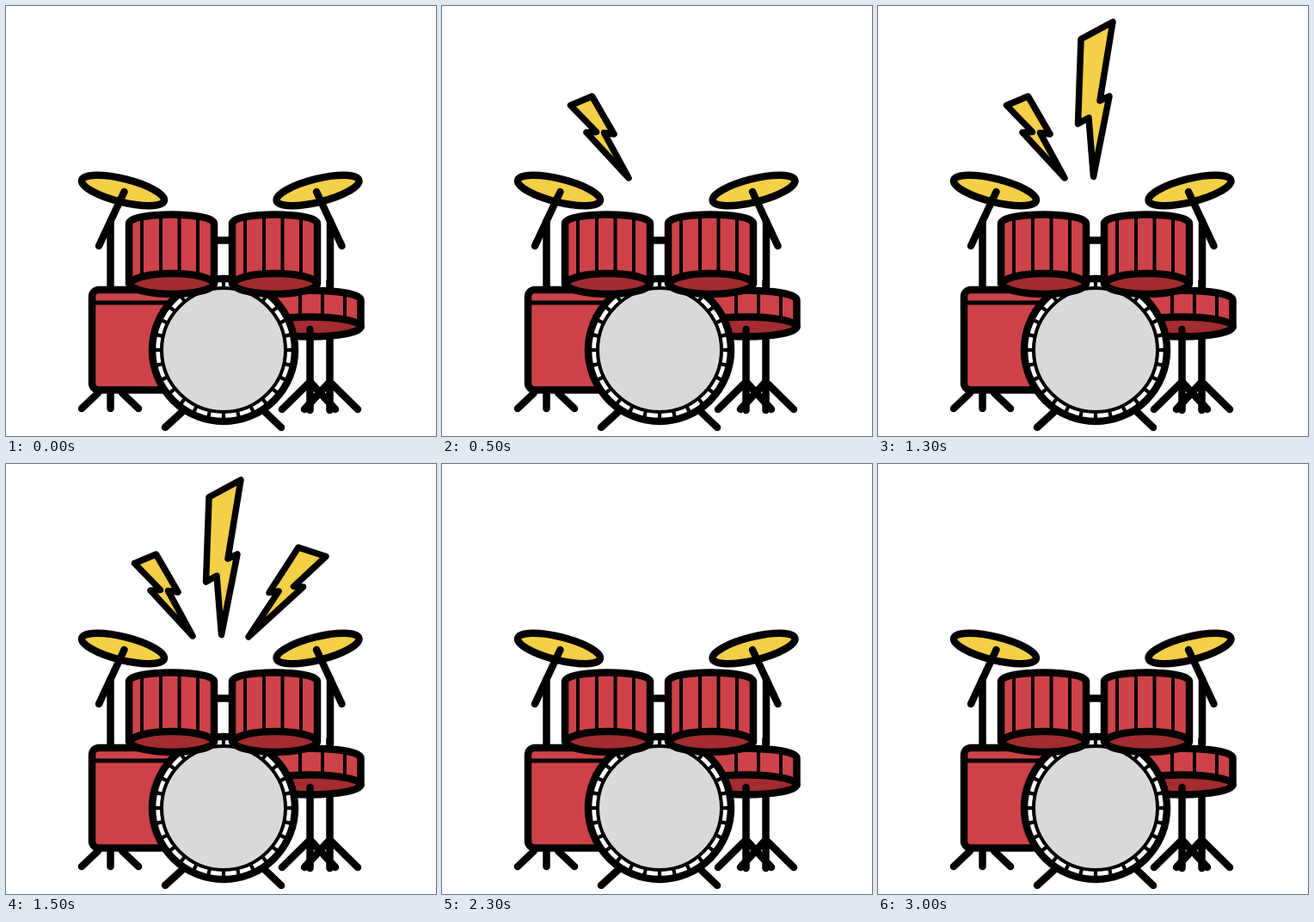
An HTML page for the animation above (3.5 s loop, 500 px wide and 500 px high).

```html
<!DOCTYPE html>
<html lang="en">
<head>
<meta charset="utf-8">
<title>Drum kit</title>
<style>
  html, body { margin: 0; height: 100%; overflow: hidden; background: #fff; }
  svg { display: block; width: 100vw; height: 100vh; }
  .kit { fill: none; stroke: #000; stroke-width: 8.5; stroke-linecap: round; stroke-linejoin: round; }
  .thin { stroke-width: 4; stroke-linecap: butt; }
  .red { fill: #cd4249; }
  .dark { fill: #a22c2f; }
  .gold { fill: #f4d047; }
  .bolt { stroke-width: 7.5; visibility: hidden; }
</style>
</head>
<body>
<svg viewBox="0 0 500 500">
  <defs>
    <g id="cymbal">
      <path d="M121.500 250V326"/>
      <ellipse class="gold" cx="136" cy="214.500" rx="49.300" ry="13.500" transform="rotate(14 136 214.500)"/>
      <path d="M137.500 216L108 279"/>
    </g>
    <g id="tom">
      <path class="red" d="M143 323V253C143 239 242 239 242 253V323Z"/>
      <path class="thin" d="M158 246V315M180 243V312M201.500 243V312M223 246V315"/>
      <ellipse class="dark" cx="193" cy="323" rx="48.500" ry="12"/>
    </g>
  </defs>
  <g class="kit">
    <path d="M376.500 320V470M376.500 437L347 469M376.500 437L409 469M353.500 437L321 469M353.500 437L383 469"/>
    <path d="M107 450L88 468M121.500 450V468M135 450L154 468M207 470L185 490M299 470L320 490"/>
    <use href="#cymbal"/>
    <use href="#cymbal" transform="matrix(-1 0 0 1 498.500 0)"/>
    <rect class="red" x="100" y="330" width="120" height="116.500" rx="8"/>
    <path d="M100 345H200" stroke-width="5"/>
    <path class="red" d="M295 373V342C295 327 412.500 327 412.500 342V373Z"/>
    <path class="thin" d="M342 333V364M368 332V364M394 334V366"/>
    <ellipse class="dark" cx="353.500" cy="373" rx="59" ry="11.500"/>
    <path d="M353.500 376V470"/>
    <circle cx="253" cy="400" r="83" fill="#fff"/>
    <circle class="thin" cx="253" cy="400" r="76" style="stroke-width:8"
      pathLength="280" stroke-dasharray="2.500 7.500" stroke-dashoffset="1.250"/>
    <circle class="thin" cx="253" cy="400" r="72" fill="#d9d9d9"/>
    <path d="M246 272.500H260"/>
    <use href="#tom"/>
    <use href="#tom" x="120"/>
    <path class="gold bolt" d="M149.500 115.500L174.500 105L200 149L188.500 147.500L217 200L168 147L179.500 146.500Z"/>
    <path class="gold bolt" d="M236 38.500L273 18.500L258 110L269 105L250.500 198.500L245 130L232.500 137Z"/>
    <path class="gold bolt" d="M340 97L372 107.500L334.500 142.500L345.500 143L282 201L317 148L306 149.500Z"/>
  </g>
</svg>
<script>
  const BEAT = 500;
  const boltsPerBeat = [0, 1, 2, 3, 0, 3, 0];
  const bolts = document.querySelectorAll('.bolt');

  function draw() {
    const beat = Math.floor(performance.now() / BEAT) % boltsPerBeat.length;
    bolts.forEach((bolt, i) => {
      bolt.style.visibility = i < boltsPerBeat[beat] ? 'visible' : 'hidden';
    });
    requestAnimationFrame(draw);
  }
  draw();
</script>
</body>
</html>
```
